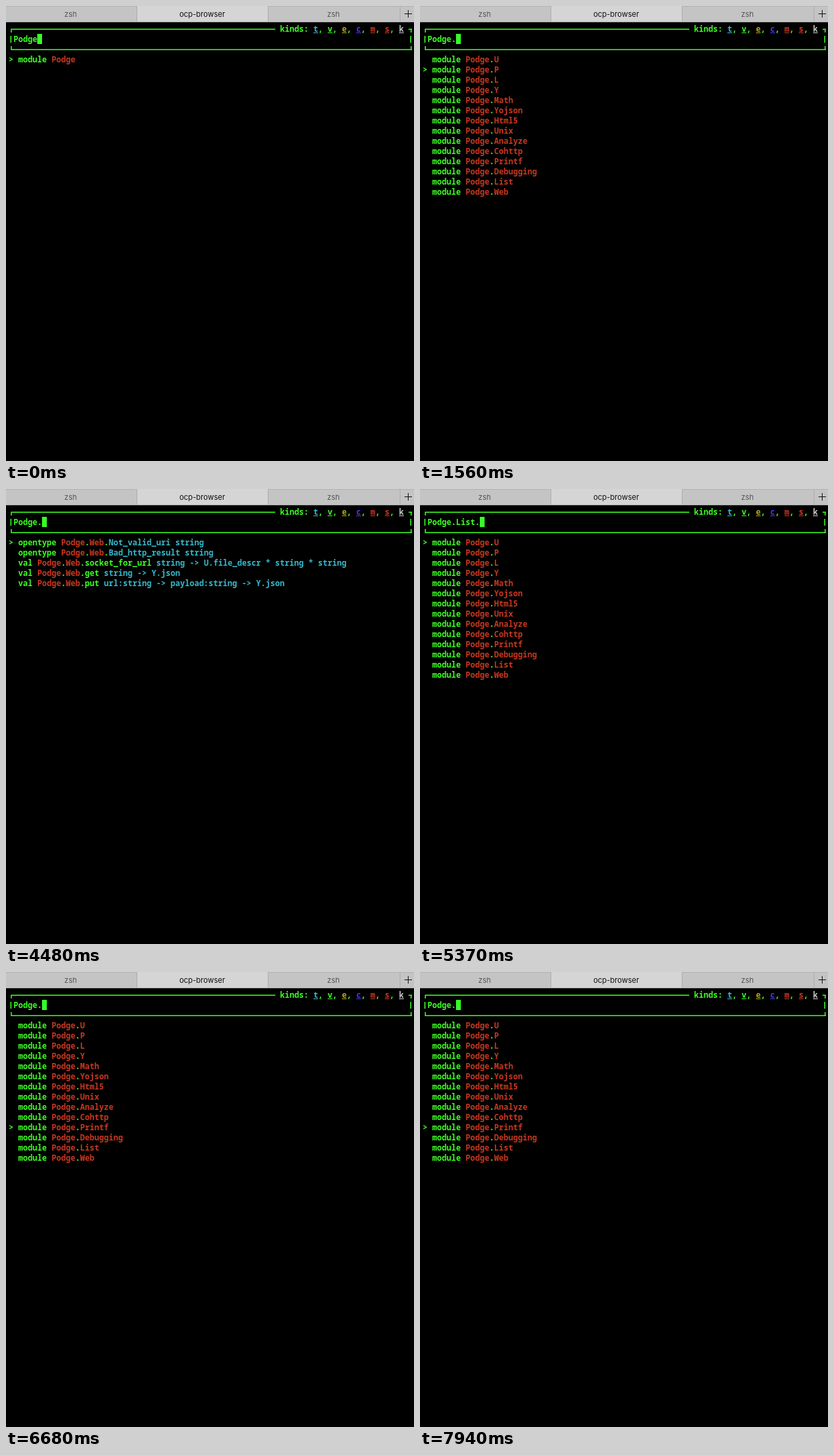
An HTML page with a canvas for the animation above (8 s loop, 600 by 670 pixels).

```html
<!DOCTYPE html>
<html lang="en">
<head>
<meta charset="utf-8">
<title>ocp-browser</title>
<style>
  html, body { margin: 0; width: 100%; height: 100%; overflow: hidden; background: #000; }
  canvas { display: block; }
</style>
</head>
<body>
<canvas id="stage" width="600" height="670"></canvas>
<script>
const ctx = document.getElementById('stage').getContext('2d');
const LOOP = 8000, CELL_W = 7, CELL_H = 15, LEFT = 4, TOP = 26;
const GREEN = '#3cff22', CURSOR = '#38fe27', RED = '#c8371f', CYAN = '#36b9cb';

const only = (...names) => names.map(name => 'module Podge.' + name);
const modules = only('U', 'P', 'L', 'Y', 'Math', 'Yojson', 'Html5', 'Unix', 'Analyze',
  'Cohttp', 'Printf', 'Debugging', 'List', 'Web');
const web = [
  'opentype Podge.Web.Not_valid_uri string',
  'opentype Podge.Web.Bad_http_result string',
  'val Podge.Web.socket_for_url string -> U.file_descr * string * string',
  'val Podge.Web.get string -> Y.json',
  'val Podge.Web.put url:string -> payload:string -> Y.json'
];
const list = [
  "val Podge.List.all f:('a -> bool) -> 'a list -> bool",
  "val Podge.List.any f:('a -> bool) -> 'a list -> bool",
  "val Podge.List.unfold_forward f:('b -> ('a * 'b) option) -> init:'b -> 'a list",
  "val Podge.List.take n:int -> 'a list -> 'a list",
  "val Podge.List.drop n:int -> 'a list -> 'a list",
  "val Podge.List.equal_parts segs:int -> 'a list -> 'a list list"
];
const printf = ["val Podge.Printf.printfn ('a, unit, string, unit) format4 -> 'a"];

// start time, input, result lines, selected row, cursor shown
const states = [
  [0, 'Podge', ['module Podge'], 0, true],
  [540, 'Podge.', modules, 0, true],
  [960, 'Podge.P', only('P', 'Printf'), 0, true],
  [1500, 'Podge.', only('P', 'Printf'), 0, true],
  [1560, 'Podge.', modules, 1, true],
  [2460, 'Podge.W', modules, 0, true],
  [2520, 'Podge.W', only('Web'), 0, true],
  [2640, 'Podge.We', only('Web'), 0, true],
  [2760, 'Podge.Web', only('Web'), 0, true],
  [3000, 'Podge.Web.', web, 0, true],
  [3590, 'Podge.Web.', web, 0, false],
  [4070, 'Podge.Web.', web, 0, true],
  [4480, 'Podge.', web, 0, true],
  [4540, 'Podge.', modules, 13, true],
  [5200, 'Podge.', modules, 12, true],
  [5370, 'Podge.List.', modules, 0, true],
  [5430, 'Podge.List.', list, 0, true],
  [6140, 'Podge.', list, 0, true],
  [6200, 'Podge.', modules, 12, true],
  [6500, 'Podge.', modules, 11, true],
  [6680, 'Podge.', modules, 10, true],
  [7160, 'Podge.Printf.', printf, 0, true],
  [7940, 'Podge.', modules, 10, true]
];

function rect(x, y, w, h, color) {
  ctx.fillStyle = color;
  ctx.fillRect(x, y, w, h);
}

// Writes on the character grid and returns the next free column.
function write(text, col, row, color = GREEN, weight = 600) {
  ctx.font = `${weight} 11.667px "Noto Sans Mono", monospace`;
  ctx.textAlign = 'left';
  ctx.fillStyle = color;
  ctx.fillText(text, LEFT + col * CELL_W, TOP + row * CELL_H + 12);
  return col + text.length;
}

function drawTabs() {
  rect(0, 0, 600, 24, '#c4c4c4');
  rect(0, 0, 600, 1, '#b4b4b4');
  rect(193, 0, 192, 24, '#d5d5d5');
  for (const x of [192, 385, 579]) rect(x, 0, 1, 23, '#adadad');
  rect(0, 23, 600, 1, '#a6a6a6');
  ctx.font = '11px Inter, sans-serif';
  ctx.textAlign = 'center';
  [['zsh', 95, '#555'], ['ocp-browser', 288.5, '#111'], ['zsh', 481.5, '#555']].forEach(([label, x, color]) => {
    ctx.fillStyle = color;
    ctx.fillText(label, x, 16);
  });
  rect(586, 11, 11, 1, '#111');
  rect(591, 6, 1, 11, '#111');
}

function drawFrame() {
  rect(7, 33.5, 389, 1.5, GREEN);
  rect(592, 33.5, 5, 1.5, GREEN);
  rect(7, 63.5, 590, 1.5, GREEN);
  for (const x of [7, 595]) {
    rect(x, 34, 1.5, 5, GREEN);
    rect(x - 0.5, 44, 1.5, 10, GREEN);
    rect(x, 59, 1.5, 5, GREEN);
  }
  let col = write('kinds: ', 57, 0);
  const kinds = { t: CYAN, v: GREEN, e: '#b9a51d', c: '#5a2dff', m: RED, s: RED, k: '#c9c9c9' };
  for (const [letter, color] of Object.entries(kinds)) {
    rect(LEFT + col * CELL_W, 39, CELL_W, 1, color);
    col = write(letter, col, 0, color);
    if (letter !== 'k') col = write(', ', col, 0);
  }
}

function drawResult(line, row) {
  const [, kind, path, name, type] = line.match(/^(\w+) ((?:[A-Z]\w*\.)*)(\w+) ?(.*)$/);
  let col = write(kind + ' ', 2, row);
  for (const part of path.split('.').slice(0, -1)) {
    col = write(part, col, row, RED);
    col = write('.', col, row);
  }
  const color = { module: RED, opentype: CYAN, val: GREEN }[kind];
  col = write(name, col, row, color, kind === 'val' ? 800 : 600);
  write(type, col + 1, row, CYAN);
}

function draw(now) {
  const time = now % LOOP;
  const [, input, lines, selected, cursor] = states.findLast(state => state[0] <= time);
  rect(0, 0, 600, 670, '#000');
  drawTabs();
  drawFrame();
  const end = write(input, 1, 1);
  if (cursor) rect(LEFT + end * CELL_W, 41, CELL_W, CELL_H, CURSOR);
  lines.forEach((line, i) => drawResult(line, i + 3));
  write('>', 0, selected + 3, GREEN, 800);
}

function tick() {
  draw(performance.now());
  requestAnimationFrame(tick);
}
tick();
</script>
</body>
</html>
```
